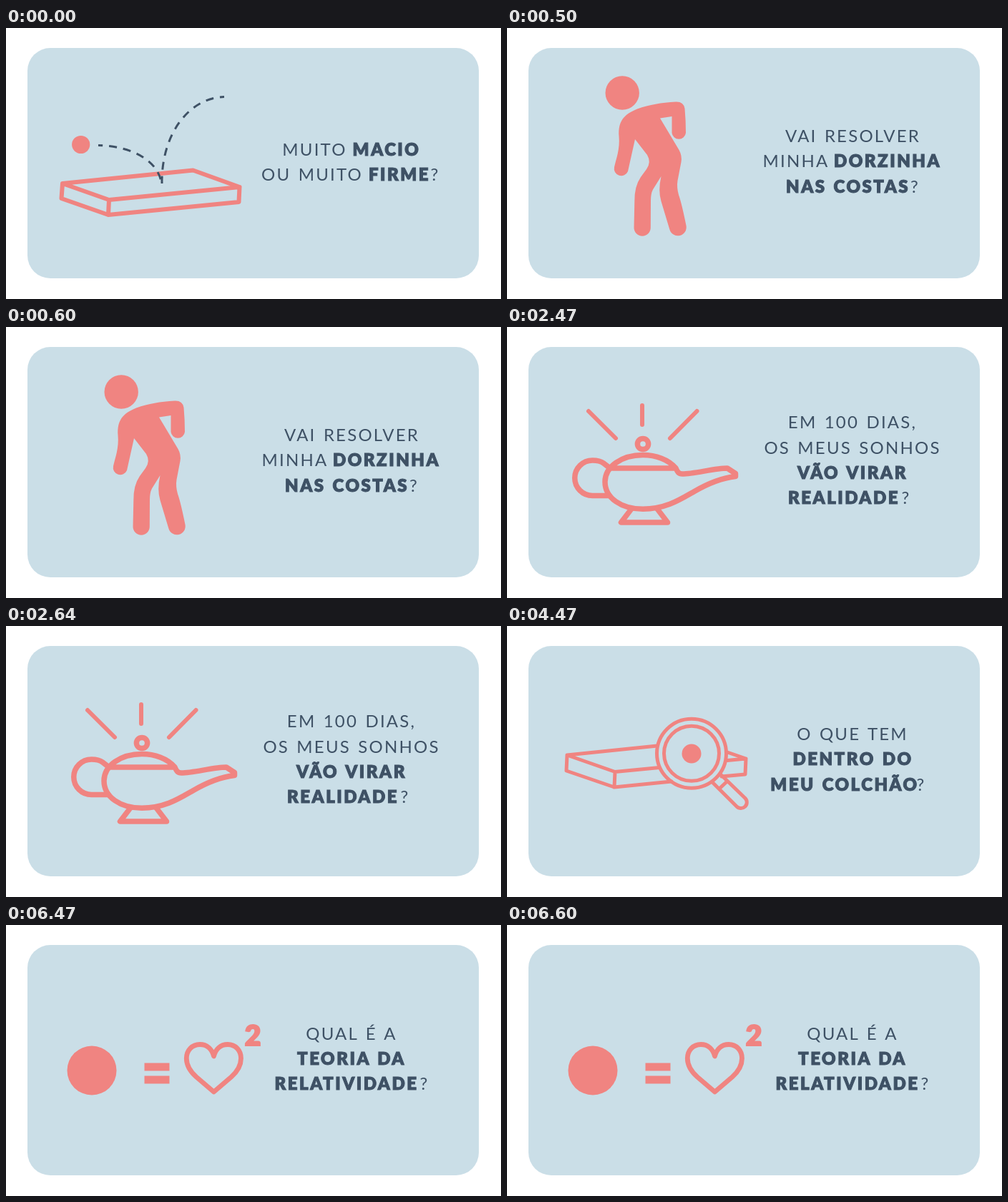
An HTML page for the animation above (8000 ms loop, 692x380 px).

```html
<!DOCTYPE html>
<html lang="pt-BR">
<head>
<meta charset="utf-8">
<title>Perguntas sobre colchão</title>
<style>
  html, body { margin: 0; width: 100%; height: 100%; overflow: hidden; background: #fff; }
  svg { display: block; width: 692px; height: 380px; }

  .card { fill: #cadee7; }
  .line { fill: none; stroke: #f08481; stroke-linecap: round; stroke-linejoin: round; }
  .solid { fill: #f08481; }
  .trail { fill: none; stroke: #3e5165; stroke-width: 3; stroke-dasharray: 11 9; stroke-dashoffset: 5; }

  text {
    font: 400 24px Lato, "Open Sans", sans-serif;
    letter-spacing: 2.2px;
    word-spacing: 2px;
    text-anchor: middle;
    fill: #3e5165;
  }
  /* A thin outline gives the heavy weight its full stem */
  .b { font-weight: 900; letter-spacing: 2.5px; stroke: #3e5165; stroke-width: 1; }
  .power { font-size: 39px; font-weight: 900; letter-spacing: 0; fill: #f08481; stroke: #f08481; stroke-width: 2; }

  /* Hard cuts at 500, 2470, 4470 and 6470 ms */
  .scene { opacity: 0; animation: 8s step-end infinite; }
  .bounce { animation-name: bounce; }
  .back { animation-name: back; }
  .lamp { animation-name: lamp; }
  .inside { animation-name: inside; }
  .theory { animation-name: theory; }
  @keyframes bounce { 0% { opacity: 1 } 6.25%, 100% { opacity: 0 } }
  @keyframes back { 0% { opacity: 0 } 6.25% { opacity: 1 } 30.875%, 100% { opacity: 0 } }
  @keyframes lamp { 0% { opacity: 0 } 30.875% { opacity: 1 } 55.875%, 100% { opacity: 0 } }
  @keyframes inside { 0% { opacity: 0 } 55.875% { opacity: 1 } 80.875%, 100% { opacity: 0 } }
  @keyframes theory { 0% { opacity: 0 } 80.875%, 100% { opacity: 1 } }
</style>
</head>
<body>
<svg viewBox="0 0 692 380">
  <rect class="card" x="30" y="28" width="631" height="323" rx="32"/>

  <g class="scene bounce">
    <path class="line" stroke-width="6" d="M79 218 L261.5 199.5 L326.5 223 L144 241 Z L77.5 239 L143 262 L325.5 244 L326.5 223 M144 241 L143 262"/>
    <path class="trail" d="M129 164.5 C180 166 213 188 217.5 218"/>
    <path class="trail" d="M305 96.5 C255 98 217 150 218 218"/>
    <circle class="solid" cx="104.7" cy="163.5" r="12.6"/>
    <text x="431.5" y="179">MUITO</text>
    <text class="b" x="532" y="179">MACIO</text>
    <text x="428" y="214">OU MUITO</text>
    <text class="b" x="550" y="214">FIRME</text>
    <text x="600" y="214">?</text>
  </g>

  <g class="scene back">
    <circle class="solid" cx="161.2" cy="91" r="23.7"/>
    <path class="solid" d="M150 195 C153 182 158 170 156.5 152 C155 130 164 121 182 113.5
      C200 107 215 105 236 103.5 Q247 103 248.5 113 Q250 130 250 147 A9.8 9.8 0 0 1 230.5 147
      L230.5 124 L214 126.5 L240.5 171 Q245 179 243.5 188 L238.5 214 Q237 223 240 234
      Q244 245 250.5 277 A11.9 11.9 0 0 1 227.5 283 L215.5 243 Q211 228 215.5 208
      L204 226.5 Q201 232 201 242 L200.8 280 A11.6 11.6 0 0 1 177.5 280 L178.3 243
      Q178 222 187 209 L195 198 Q202 188 196 178 L179 156 L169 201 A10 10 0 0 1 150 195 Z"/>
    <text x="483.5" y="160">VAI RESOLVER</text>
    <text x="404" y="195">MINHA</text>
    <text class="b" x="532" y="195">DORZINHA</text>
    <text class="b" x="476.5" y="231">NAS COSTAS</text>
    <text x="570.5" y="231">?</text>
  </g>

  <g class="scene lamp">
    <g class="line" stroke-width="7.5">
      <circle cx="190" cy="164" r="7.6"/>
      <path d="M144 198 H236 C226 186 208 179.5 190 179.5 C160 179.5 137 196 137 217
        C137 240 160 255.3 190 255.3 C222 255.3 242 242 262 230.5 C280 220 298 212 319.5 209.5
        V205.5 L308 198 C290 198 262 206 245 206 C239 206 238 202 236 198"/>
      <path d="M144 198 L135 191 C131 188 126 187 119.5 187 A24.7 24.7 0 0 0 119.5 236.5 H143"/>
      <path d="M174 255 L159.5 274 H224.5 L210 255"/>
      <path stroke-width="6" d="M114 118 L152 156 M189 110 V137 M265.5 118 L228 156"/>
    </g>
    <text x="483" y="142">EM 100 DIAS,</text>
    <text x="483" y="178">OS MEUS SONHOS</text>
    <text class="b" x="483" y="213">VÃO VIRAR</text>
    <text class="b" x="471" y="248">REALIDADE</text>
    <text x="558" y="248">?</text>
  </g>

  <g class="scene inside">
    <g class="line" stroke-width="5">
      <path d="M210 168 L84 181 L151 204.5 L213 198.5 M84 181 L83 203 L150 226 L230 218 M151 204.5 L150 226"/>
      <path d="M308 177 L334 186 L308 188.5 M334 186 L333 208 L300 211"/>
      <circle cx="258" cy="178.7" r="48.5"/>
      <circle cx="258" cy="178.7" r="38.5"/>
      <path d="M288 220 L321 253 A8.3 8.3 0 0 0 333 241.5 L299 208.5 M297 228 L307.5 218"/>
    </g>
    <circle class="solid" cx="258" cy="179" r="13.5"/>
    <text x="483" y="160">O QUE TEM</text>
    <text class="b" x="483.5" y="195">DENTRO DO</text>
    <text class="b" x="472" y="231">MEU COLCHÃO</text>
    <text x="579" y="231">?</text>
  </g>

  <g class="scene theory">
    <circle class="solid" cx="120" cy="204" r="34.5"/>
    <path class="solid" d="M193.5 193.5 h35 v11 h-35 Z M193.5 211.5 h35 v11 h-35 Z"/>
    <path class="line" stroke-width="6.8" d="M290.5 184 C288 174 281 167.5 271 167.5
      C260 167.5 252.3 176 252.3 187 C252.3 196 256 204 266 213 L290.5 234 L315 213
      C325 204 328.5 196 328.5 187 C328.5 176 321 167.5 310 167.5 C300 167.5 293 174 290.5 184 Z"/>
    <text class="power" x="345" y="169">2</text>
    <text x="483" y="161">QUAL É A</text>
    <text class="b" x="483" y="196">TEORIA DA</text>
    <text class="b" x="476" y="231">RELATIVIDADE</text>
    <text x="585" y="231">?</text>
  </g>
</svg>
</body>
</html>
```
